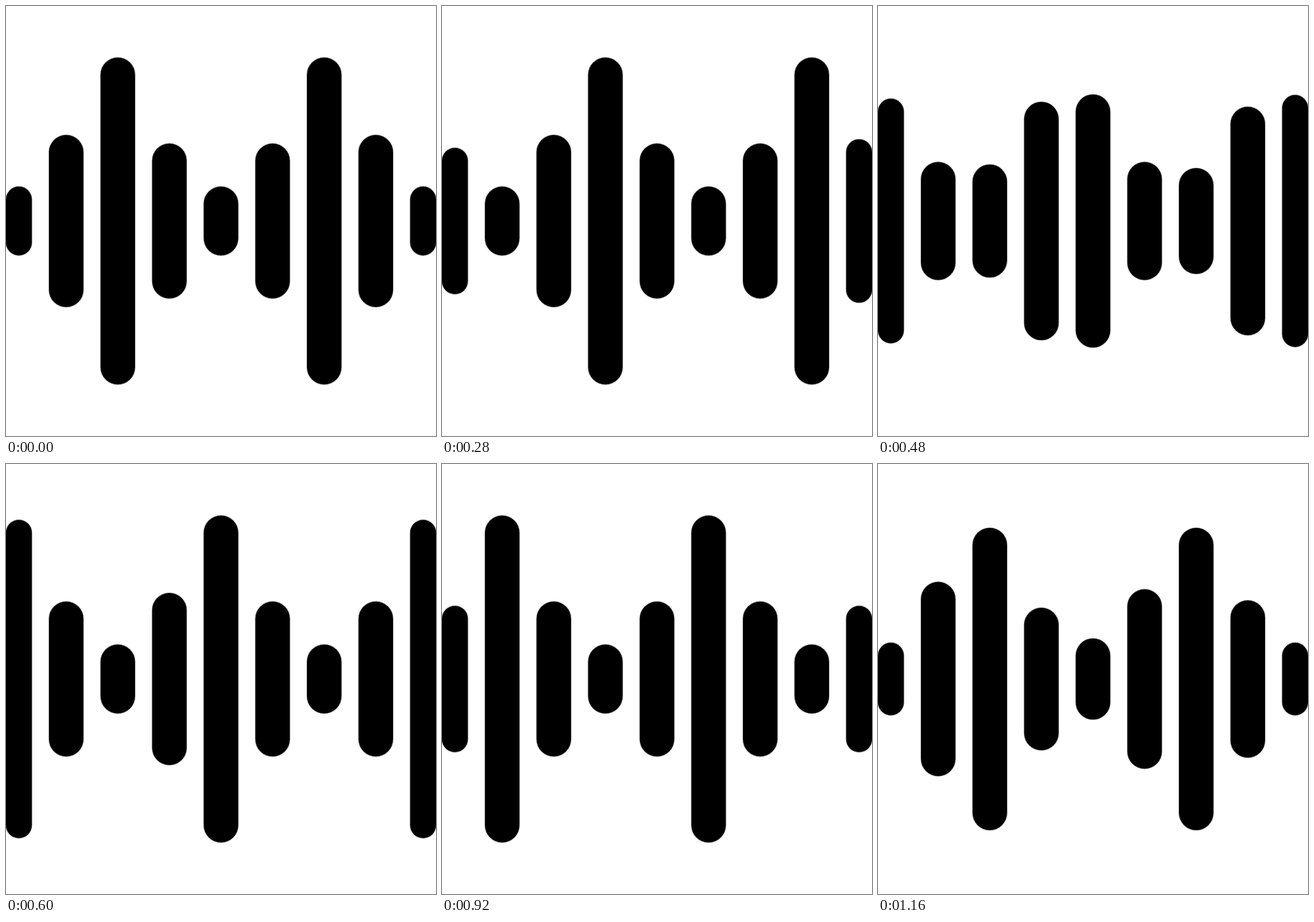
Recreate the animation shown at these times as an HTML page with a canvas. Size 640x640 px, loop 1200 ms.

```html
<!DOCTYPE html>
<html lang="en">
<head>
<meta charset="utf-8">
<title>Sound wave</title>
<style>
  html, body { margin: 0; width: 100%; height: 100%; overflow: hidden; background: #fff; }
  canvas { display: block; width: 100vmin; height: 100vmin; }
</style>
</head>
<body>
<canvas id="stage" width="640" height="640"></canvas>
<script>
const ctx = document.getElementById('stage').getContext('2d');
const SIZE = 640, UNIT = SIZE / 50, PITCH = 6 * UNIT, BARS = 9;
const STEP = 40, STEPS = 30, SEGMENT = 7;

// Half-height in units: a four-bar wave that moves one bar right per pose,
// with slightly taller outer shoulders until the last pose
function poseHeight(i, pose) {
  const shift = pose % 4;
  const place = i - shift;
  const isEdge = i === 0 || i === BARS - 1;
  const shoulder = shift < 3 && Math.abs(place - 4) === 3 ? 10 : 9;
  const height = place % 2 ? shoulder : place % 4 ? 19 : 4;
  return height - (isEdge && pose > 0 ? 0.5 : 0);
}

// Linear progress through the poses; the second and third are held one extra step
function progress(ms) {
  const step = Math.floor(ms / STEP + 1e-6) % STEPS;
  const holds = (step > SEGMENT) + (step > 2 * SEGMENT + 1);
  return (step - holds) / SEGMENT;
}

function drawBar(i, p) {
  const pose = Math.floor(p);
  const from = poseHeight(i, pose), to = poseHeight(i, pose + 1);
  const half = (from + (to - from) * (p - pose)) * UNIT;
  const left = Math.max(0, i * PITCH - UNIT);
  const width = Math.min(SIZE, i * PITCH + 3 * UNIT) - left;
  ctx.beginPath();
  ctx.roundRect(left, SIZE / 2 - half, width, half * 2, width / 2);
  ctx.fill();
  ctx.stroke();
}

function draw(ms) {
  const p = progress(ms);
  ctx.fillStyle = '#fff';
  ctx.fillRect(0, 0, SIZE, SIZE);
  ctx.fillStyle = '#000';
  // Faint outline softens the edges
  ctx.strokeStyle = 'rgba(0, 0, 0, 0.35)';
  ctx.lineWidth = 1.4;
  for (let i = 0; i < BARS; i++) drawBar(i, p);
}

let start;
function tick(now) {
  start ??= now;
  draw(Math.max(0, now - start));
  requestAnimationFrame(tick);
}
draw(0);
requestAnimationFrame(tick);
</script>
</body>
</html>
```
